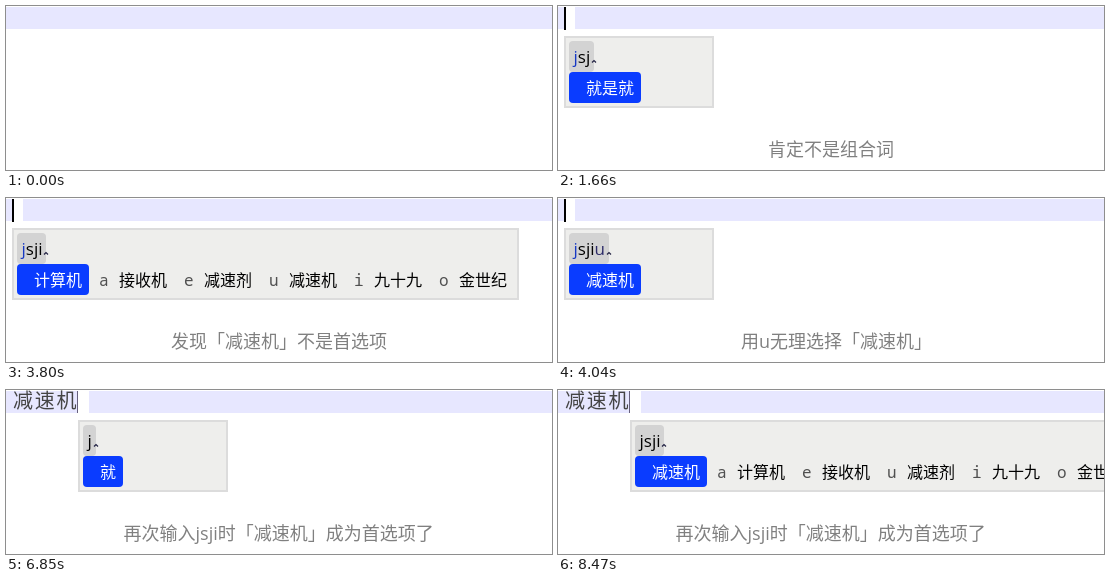
These frames come from a looping animation (546x164 px, 8590 ms). An HTML page with a canvas:

```html
<!DOCTYPE html>
<html lang="zh-CN">
<head>
<meta charset="utf-8">
<style>
html, body { margin: 0; width: 100%; height: 100%; overflow: hidden; background: #fff; }
canvas { display: block; }
</style>
</head>
<body>
<canvas id="stage" width="546" height="164"></canvas>
<script>
const ctx = document.getElementById("stage").getContext("2d");
const LOOP = 8590;
const SHIFT = 66;
const SANS = '"Open Sans", "Noto Sans CJK SC", "Noto Sans CJK", sans-serif';
const CJK = '"Noto Sans CJK SC", "Noto Sans CJK", sans-serif';
const MONO = '"Noto Sans Mono", monospace';
const LABELS = ["", "a", "e", "u", "i", "o"];

const FIRST = ["计算机", "接收机", "减速剂", "减速机", "九十九", "金世纪"];
const SECOND = ["减速机", "计算机", "接收机", "减速剂", "九十九", "金世纪"];

// [start, typed keys, candidates]
const INPUT = [
  [0, "", []],
  [120, "j", ["就"]],
  [730, "js", ["就是"]],
  [1430, "jsj", ["就是就"]],
  [2190, "jsji", FIRST],
  [3920, "jsjiu", ["减速机"]],
  [6330, "", []],
  [6380, "j", ["就"]],
  [6910, "js", ["就是"]],
  [7440, "jsj", ["就是就"]],
  [8250, "jsji", SECOND]
];

// [start, text, left]
const CAPTIONS = [
  [0, "", 0],
  [120, "肯定不是组合词", 210],
  [2190, "发现「减速机」不是首选项", 165],
  [4040, "用u无理选择「减速机」", 183],
  [6330, "", 0],
  [6380, "再次输入jsji时「减速机」成为首选项了", 117.5]
];

// Times at which each cursor flips, starting hidden
const THICK = [650, 1130, 1660, 2190, 2720, 3250, 3800, 6330, 6910, 7440, 7940, 8470];
const THIN = [6330, 6630, 6850, 7130, 7360, 7610, 7860, 8080, 8330];

const at = (list, t) => list.filter(s => s[0] <= t).pop();
const isOn = (flips, t) => flips.filter(f => f <= t).length % 2 === 1;

function rect(x, y, w, h, color) {
  ctx.fillStyle = color;
  ctx.fillRect(x, y, w, h);
}

function round(x, y, w, h, r, color) {
  ctx.fillStyle = color;
  ctx.beginPath();
  ctx.roundRect(x, y, w, h, r);
  ctx.fill();
}

function text(str, x, y, font, color, spacing = 0) {
  ctx.font = font;
  ctx.letterSpacing = spacing + "px";
  ctx.fillStyle = color;
  ctx.fillText(str, x, y);
  ctx.letterSpacing = "0px";
}

function drawBar(t) {
  const dx = t >= 6380 ? SHIFT : 0;
  rect(0, 1, 546, 22, "#e7e7ff");
  if (t >= 6330) text("减速机", 7, 17.5, "300 20px " + CJK, "#444", 1.7);
  if (t >= 120) rect(6 + dx, 1, 11, 22, "#fff");
  if (isOn(THIN, t)) rect(71, 1, 1, 22, "#66607c");
  if (isOn(THICK, t)) rect(6 + dx, 1, 2, 23, "#000");
}

function drawKeys(keys, blueStart) {
  const font = "17px " + SANS;
  ctx.font = font;
  const w = Math.round(ctx.measureText(keys).width + 8.4);
  round(11, 35, w, 31, 4, "#d3d3d3");
  [...keys].forEach((key, i) => {
    ctx.font = font;
    const x = 15.5 + ctx.measureText(keys.slice(0, i)).width;
    const color = i === 0 && blueStart ? "#1638c4" : key === "u" ? "#2c2a68" : "#000";
    text(key, x, 57, font, color);
  });
  const end = 11 + w;
  ctx.strokeStyle = "#224";
  ctx.lineWidth = 1.2;
  ctx.beginPath();
  ctx.moveTo(end - 2, 56.5);
  ctx.lineTo(end, 54.5);
  ctx.lineTo(end + 2, 56.5);
  ctx.stroke();
}

function drawPanel(t) {
  const [, keys, words] = at(INPUT, t);
  if (!keys) return;
  const first = t < 6330;
  ctx.save();
  ctx.translate(first ? 0 : SHIFT, 0);
  const w = words.length > 1 ? 507 : 150;
  rect(6, 30, w, 72, "#dcdcdc");
  rect(8, 32, w - 4, 68, "#eeeeec");
  drawKeys(keys, first);
  round(11, 66, 24 + 16 * words[0].length, 31, 4, "#0a3cff");
  words.forEach((word, i) => {
    const x = 28 + 85 * i;
    text(LABELS[i], x - 20, 88, "16px " + MONO, "#505050");
    text(word, x, 88, "16px " + CJK, i ? "#000" : "#fff");
  });
  ctx.restore();
}

function draw(now) {
  const t = now % LOOP;
  rect(0, 0, 546, 164, "#fff");
  drawBar(t);
  drawPanel(t);
  const [, caption, left] = at(CAPTIONS, t);
  text(caption, left, 150, "18px " + SANS, "#808080");
}

let start;
function tick(now) {
  start ??= now;
  draw(now - start);
  requestAnimationFrame(tick);
}
draw(0);
requestAnimationFrame(tick);
</script>
</body>
</html>
```
